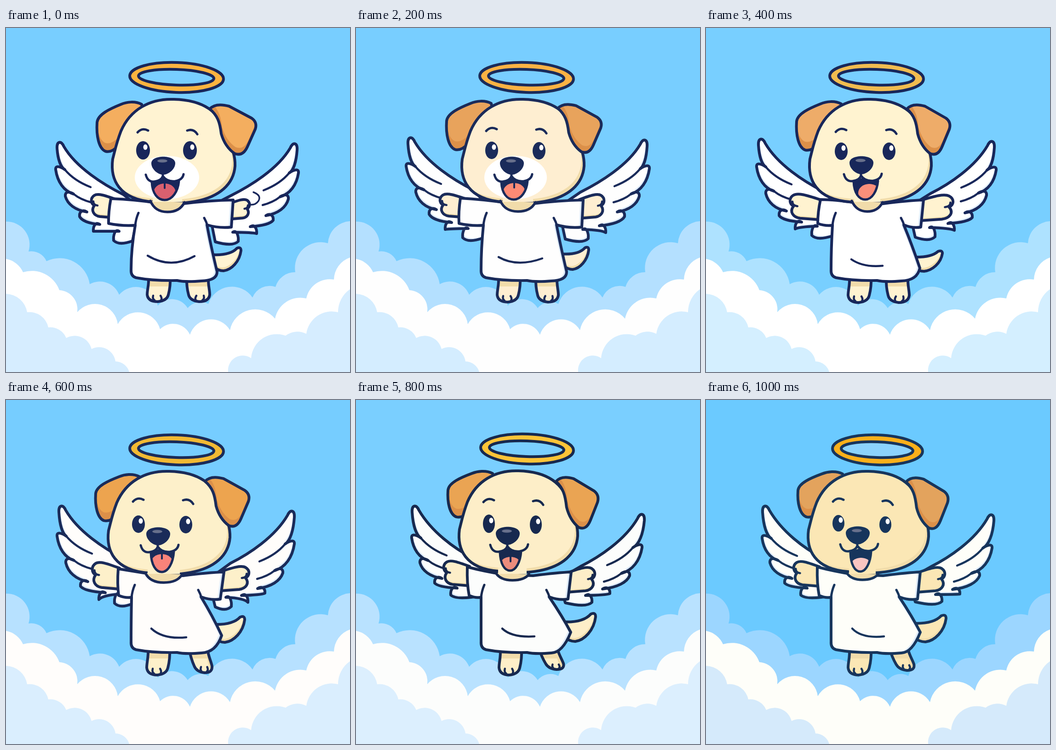
An HTML page with a canvas that plays this animation: 748 px wide and 748 px high, repeating every 1.2 s.

```html
<!DOCTYPE html>
<html lang="en">
<head>
<meta charset="utf-8">
<title>Angel puppy</title>
<style>
html, body { margin: 0; width: 100%; height: 100%; overflow: hidden; background: #78ceff; }
canvas { display: block; }
</style>
</head>
<body>
<canvas width="748" height="748"></canvas>
<script>
const ctx = document.querySelector('canvas').getContext('2d');
const STEP = 200;
const CREAM_SHADE = '#f1dcaa', EAR_SHADE = '#dc9049', WHITE_SHADE = '#dbe9f9';

const clouds = {
  back: 'M0 421A50 50 0 0 1 49 486A36 36 0 0 1 88 507A66 66 0 0 1 182 557A45 45 0 0 1 246 580A48 48 0 0 1 330 604A40 40 0 0 1 395 609A36 36 0 0 1 440 600A54 54 0 0 1 536 586A40 40 0 0 1 586 563A44 44 0 0 1 629 531A56 56 0 0 1 700 468A51 51 0 0 1 748 420V748H0Z',
  front: 'M0 502A50 50 0 0 1 37 531A64 64 0 0 1 116 570A42 42 0 0 1 155 618A50 50 0 0 1 243 644A50 50 0 0 1 335 655A40 40 0 0 1 400 667A48 48 0 0 1 487 657A56 56 0 0 1 585 632A56 56 0 0 1 653 588A52 52 0 0 1 713 547A52 52 0 0 1 748 499V748H0Z',
  near: 'M0 578A48 48 0 0 1 46 618A42 42 0 0 1 92 651A38 38 0 0 1 131 674A38 38 0 0 1 186 698A36 36 0 0 1 238 725A32 32 0 0 1 268 748H0ZM483 748A32 32 0 0 1 533 718A56 56 0 0 1 608 669A42 42 0 0 1 653 665A56 56 0 0 1 722 618A60 60 0 0 1 748 568V748Z'
};

// Parts drawn once; every pose fits them into its own box [x, y, w, h, skew].
const parts = {
  head: { box: [231, 155, 267, 226],
    d: 'M365 155C312 153 270 178 250 224C240 250 238 262 232 285C226 330 246 372 318 378Q370 385 412 377C464 367 495 340 498 300C499 272 487 252 479 232C470 195 444 157 365 155Z' },
  earL: { box: [198, 161, 102, 109],
    d: 'M295 166C280 158 262 161 250 166C225 176 200 188 198 205C196 235 202 262 216 268Q230 272 245 255L300 190Z' },
  earR: { box: [443, 167, 101, 107],
    d: 'M443 176C453 165 470 166 485 170L534 196Q547 205 542 220L525 258Q515 280 497 273Q476 258 468 230C465 205 460 190 443 176Z' },
  hand: { box: [185, 361, 55, 51],
    d: 'M240 373C215 364 200 359 192 364C183 370 184 381 192 386C184 397 191 408 204 410L240 413Z',
    line: 'M190 377Q190 385 199 386' },
  leg: { box: [307, 540, 50, 55],
    d: 'M310 540C311 560 307 568 307 580Q309 595 330 595Q350 593 353 580Q358 562 357 540Z',
    line: 'M320 582Q318 589 323 592M336 582Q340 588 337 592' },
  tail: { box: [450, 477, 61, 51],
    d: 'M450 493C475 494 492 490 502 479Q511 475 511 484C508 508 490 526 473 528Q462 528 450 519Z' },
  mouth: { box: [317, 333, 59, 41],
    d: 'M317 335C318 360 330 374 345 374C362 374 374 355 376 333L345 328Z' }
};

const poses = [
  { sky: '#78ceff', back: '#b9e2ff', front: '#ffffff', near: '#d6edff', ink: '#18265a', cream: '#fff3d2', earC: '#f4ae5f', gold: '#fcb340', pink: '#d9606f',
    halo: [371, 107, 102], head: [231, 155, 267, 226], earL: [198, 161, 102, 109], earR: [443, 167, 101, 107],
    handL: [185, 361, 55, 51], handR: [530, 372, -45, 43], legL: [307, 540, 50, 55], legR: [443, 540, -50, 55], tail: [450, 477, 61, 51],
    wingL: [111, 258, 108, 304, 129, 362, 160, 406, 190, 438, 234, 458], wingR: [633, 261, 636, 311, 614, 368, 581, 414, 545, 443, 505, 460],
    dress: [228, 371, 223, 494, 490, 281, 437, 459, 530], neck: [314, 388, 400], smile: 'M308 495Q358 525 410 496', curl: 'M538 357Q556 364 549 376Q542 386 530 384',
    eyes: [298, 266, 400, 266, 15, 20], brow: -39, nose: [342, 299], mouth: [317, 333, 59, 41], tongue: [345, 358], muzzle: 70 },
  { sky: '#78ceff', back: '#b4e0ff', front: '#fefefe', near: '#d4edff', ink: '#1a2b5a', cream: '#feeed1', earC: '#e8a35c', gold: '#fbb244', pink: '#fd8a75',
    halo: [371, 107, 102], head: [230, 155, 266, 226], earL: [197, 159, 102, 107], earR: [439, 166, 95, 104],
    handL: [182, 360, 58, 51], handR: [540, 361, -55, 52], legL: [307, 540, 50, 56], legR: [440, 540, -49, 56], tail: [450, 476, 56, 49],
    wingL: [113, 248, 109, 297, 130, 353, 159, 401, 194, 434, 232, 452], wingR: [633, 253, 638, 302, 616, 362, 584, 406, 543, 441, 505, 454],
    dress: [227, 370, 224, 494, 491, 277, 436, 458, 530], neck: [314, 390, 399], smile: 'M310 498Q350 521 405 501',
    eyes: [295, 266, 398, 267, 14, 19], brow: -42, nose: [339, 299], mouth: [316, 333, 57, 40], tongue: [344, 357], muzzle: 68 },
  { sky: '#78cfff', back: '#aee2ff', front: '#ffffff', near: '#d4efff', ink: '#18275a', cream: '#fff3d0', earC: '#eeac69', gold: '#f1bc50', pink: '#fb8f7a',
    halo: [371, 107, 102], head: [225, 155, 265, 226], earL: [197, 160, 102, 107], earR: [437, 167, 94, 107],
    handL: [182, 360, 66, 56], handR: [538, 362, -73, 56], legL: [309, 540, 50, 57], legR: [442, 540, -50, 57], tail: [450, 484, 64, 45],
    wingL: [114, 251, 110, 298, 130, 356, 159, 404, 194, 433, 230, 447], wingR: [627, 256, 631, 305, 610, 360, 579, 408, 540, 436, 498, 450],
    dress: [249, 373, 243, 473, 467, 275, 430, 465, 522], neck: [317, 384, 399], smile: 'M316 503Q342 521 384 517',
    eyes: [294, 268, 398, 268, 14, 19], brow: -42, nose: [338, 298], mouth: [321, 332, 53, 41], tongue: [355, 359] },
  { sky: '#76cdff', back: '#b7e1ff', front: '#fffdfb', near: '#daeefe', ink: '#1a2b59', cream: '#fdf0ca', earC: '#eda44f', gold: '#f2b933', pink: '#f9837a',
    halo: [371, 108, 102], head: [222, 155, 265, 224], earL: [195, 162, 100, 102], earR: [433, 168, 96, 106],
    handL: [187, 352, 60, 58], handR: [529, 361, -64, 53], legL: [306, 540, 50, 58], legR: [440, 540, -42, 53, .2], tail: [450, 470, 69, 57],
    wingL: [115, 240, 111, 292, 130, 350, 162, 401, 202, 430, 236, 438], wingR: [627, 251, 627, 309, 602, 372, 563, 416, 526, 436, 490, 445],
    dress: [244, 367, 245, 474, 466, 273, 424, 469, 512], neck: [303, 383, 397], smile: 'M316 497Q342 521 392 516',
    eyes: [288, 270, 391, 271, 14, 19], brow: -49, nose: [331, 296], mouth: [315, 330, 50, 44], tongue: [339, 355] },
  { sky: '#7acfff', back: '#b9e2ff', front: '#fcfdfc', near: '#dceffe', ink: '#17294f', cream: '#fdeec8', earC: '#eaa453', gold: '#fdc438', pink: '#ec8c7c',
    halo: [372, 106, 101], head: [224, 154, 258, 221], earL: [200, 155, 102, 101], earR: [435, 168, 92, 110],
    handL: [190, 349, 57, 54], handR: [520, 363, -61, 54], legL: [311, 540, 49, 58], legR: [440, 540, -42, 46, .28], tail: [450, 463, 71, 62],
    wingL: [122, 240, 121, 296, 139, 350, 171, 394, 206, 420], wingR: [627, 258, 622, 317, 595, 378, 552, 417, 513, 436],
    dress: [242, 363, 246, 468, 461, 272, 420, 467, 505], neck: [304, 376, 392], smile: 'M318 497Q339 517 388 514',
    eyes: [289, 269, 391, 271, 13, 20], brow: -47, nose: [330, 295], mouth: [313, 329, 46, 42], tongue: [336, 361] },
  { sky: '#6bcaff', back: '#9cd6ff', front: '#fefef9', near: '#d5eafb', ink: '#17355c', cream: '#fbe7b5', earC: '#e3a35d', gold: '#fbb01a', pink: '#f9c5c1', hole: '#8bd3fd',
    halo: [373, 108, 98], head: [222, 155, 262, 221], earL: [200, 156, 102, 100], earR: [435, 169, 92, 110],
    handL: [190, 350, 57, 54], handR: [520, 363, -61, 54], legL: [309, 540, 50, 58], legR: [441, 540, -42, 48, .28], tail: [450, 467, 72, 59],
    wingL: [123, 240, 122, 297, 139, 350, 171, 394, 206, 420], wingR: [626, 259, 622, 318, 595, 378, 552, 418, 513, 434],
    dress: [242, 363, 246, 466, 460, 272, 420, 466, 505], neck: [306, 374, 391], smile: 'M318 497Q339 519 387 514',
    eyes: [288, 268, 390, 271, 13, 18], brow: -47, nose: [330, 294], mouth: [314, 330, 45, 43], tongue: [337, 363] }
];

function fit(d, [bx, by, bw, bh], [x, y, w, h, k = 0]) {
  const a = w / bw, e = h / bh, path = new Path2D();
  path.addPath(new Path2D(d), new DOMMatrix([a, 0, k, e, x - a * bx - k * by, y - e * by]));
  return path;
}

function fill(path, color) {
  ctx.fillStyle = color;
  ctx.fill(path);
}

function line(path, width = 4.5) {
  ctx.lineWidth = width;
  ctx.stroke(typeof path === 'string' ? new Path2D(path) : path);
}

function oval(x, y, rx, ry, color, turn = 0) {
  const path = new Path2D();
  path.ellipse(x, y, rx, ry, turn, 0, 7);
  fill(path, color);
  return path;
}

// Outlined shape whose lit area is moved by (dx, dy) over its shade.
function paint(path, color, shade, dx, dy) {
  fill(path, shade);
  ctx.save();
  ctx.clip(path);
  ctx.translate(dx, dy);
  fill(path, color);
  ctx.restore();
  line(path, 6);
}

function part(name, box, color, shade, dx, dy) {
  const p = parts[name];
  paint(fit(p.d, p.box, box), color, shade, dx, dy);
  if (p.line) line(fit(p.line, p.box, box));
}

// Feather tips run from the top down; s is 1 for the left wing, -1 for the right.
function wing(tips, s, white) {
  const rootX = s > 0 ? 255 : 488, endX = s > 0 ? 275 : 455;
  const [x0, y0] = tips;
  let d = `M${rootX} ${y0 + 104}C${rootX - 42 * s} ${y0 + 83} ${x0 + 42 * s} ${y0 + 46} ${x0 + 15 * s} ${y0}` +
    `C${x0 + 9 * s} ${y0 - 14} ${x0 - s} ${y0 - 12} ${x0} ${y0 + 4}`;
  let veins = '';
  for (let i = 2; i < tips.length; i += 2) {
    const n = i / 2 - 1, x = tips[i], y = tips[i + 1];
    const px = tips[i - 2], py = tips[i - 1] + 4;
    const nx = x + (20 - 2 * n) * s, ny = y + 4 - 5 * n;
    const w = nx - px, h = ny - py;
    d += `C${px + w * .1} ${py + h * .5} ${nx - w * .55} ${ny - h * .12} ${nx} ${ny}` +
      `C${nx - 9 * s} ${ny - 6} ${x - s} ${y - 7} ${x} ${y + 4}`;
    if (n < 2) veins += `M${nx} ${ny}q${(20 - 5 * n) * s} ${24 - 12 * n} ${(56 - 18 * n) * s} ${38 - 20 * n}`;
  }
  const [x, y] = tips.slice(-2);
  d += `Q${x + 12 * s} ${y + 16} ${endX} ${y + 5}L${endX + 15 * s} 390Z`;
  paint(new Path2D(d), white, WHITE_SHADE, 3 * s, -5);
  line(veins);
}

function halo({ halo: [x, y, r], gold, hole, sky }) {
  const outer = oval(x, y + .5, r, 32.5, gold, .035);
  const inner = oval(x - 1, y, r - 20, 17, hole || sky, .035);
  line(outer, 6);
  line(inner, 6);
}

function dress([lt, top, lb, rt, rb, lx, ax, hx, hy], smile, white) {
  paint(new Path2D(`M${lt} ${top}Q280 373 325 380L385 382Q440 375 ${rt} 374L${rb} 433Q${(rb + ax) / 2} 436 ${ax} 428` +
    `Q${(hx + 430) / 2} 470 ${hx} ${hy}Q${hx + (hy - 530) * .7} 549 425 550Q390 553 372 549Q320 550 283 543Q271 540 272 525` +
    `Q272 480 ${lx} 429Q${(lx + lb) / 2} 431 ${lb} 425Q${(lt + lb) / 2 - 3} 400 ${lt} ${top}Z`), white, WHITE_SHADE, -6, -2);
  line(`M${lx + 7} 402Q${lx + 1} 416 ${lx} 430M${ax - 6} 413Q${ax - 1} 422 ${ax + 1} 430`, 5);
  line(smile);
}

// The neck opens into the chin, so it hides the lower edge of the head.
function neck([l, r, b], cream) {
  const path = new Path2D(`M${l} 376Q${l + 10} ${b} ${(l + r) / 2} ${b}Q${r - 10} ${b} ${r} 379`);
  fill(path, CREAM_SHADE);
  ctx.fillStyle = cream;
  ctx.fillRect(l + 5, 366, r - l - 10, 12);
  line(path, 5.5);
}

function face(p) {
  const [lx, ly, rx, ry, w, h] = p.eyes, [nx, ny] = p.nose, [tx, ty] = p.tongue;
  if (p.muzzle) oval(nx + 8, ny + 26, p.muzzle, 47, '#ffffff');
  for (const [x, y] of [[lx, ly], [rx, ry]]) {
    oval(x, y, w, h, p.ink);
    oval(x + 5, y - 7, 4.5, 6, '#ffffff');
  }
  line(`M${lx - 12} ${ly + p.brow}q10 -11 23 -4M${rx - 6} ${ry + p.brow - 4}q14 -5 22 8`, 5);

  const mouth = fit(parts.mouth.d, parts.mouth.box, p.mouth);
  fill(mouth, p.ink);
  ctx.save();
  ctx.clip(mouth);
  oval(tx, ty, 24, 20, p.pink);
  if (tx - nx < 10 && !p.hole) line(`M${tx} ${ty - 20}v10`, 4);
  ctx.restore();
  line(mouth, 5);

  ctx.save();
  ctx.translate(nx - 342, ny - 299);
  // Cover the upper lip with fur before drawing its line.
  fill(new Path2D('M306 320Q309 334 322 334Q338 332 341 322Q350 335 368 333Q384 330 386 318Z'), p.muzzle ? '#ffffff' : p.cream);
  line('M304 319Q308 335 322 334Q338 332 341 322Q350 335 368 333Q384 330 386 318M341 316V324', 5);
  fill(new Path2D('M316 294C316 275 368 275 368 294C368 308 352 319 342 319C330 319 316 307 316 294Z'), p.ink);
  oval(340, 289, 11, 3.5, '#68708c');
  ctx.restore();
}

function draw(p) {
  ctx.lineJoin = ctx.lineCap = 'round';
  ctx.strokeStyle = p.ink;
  ctx.fillStyle = p.sky;
  ctx.fillRect(0, 0, 748, 748);
  for (const name in clouds) fill(new Path2D(clouds[name]), p[name]);

  halo(p);
  wing(p.wingL, 1, p.front);
  wing(p.wingR, -1, p.front);
  part('tail', p.tail, p.cream, CREAM_SHADE, -2, -7);
  part('hand', p.handL, p.cream, CREAM_SHADE, 0, -5);
  part('hand', p.handR, p.cream, CREAM_SHADE, 0, -5);
  if (p.curl) line(p.curl, 3.5);
  part('leg', p.legL, p.cream, CREAM_SHADE, 0, 22);
  part('leg', p.legR, p.cream, CREAM_SHADE, 0, 22);
  part('earL', p.earL, p.earC, EAR_SHADE, 0, -18);
  dress(p.dress, p.smile, p.front);
  part('head', p.head, p.cream, CREAM_SHADE, -6, -8);
  neck(p.neck, p.cream);
  part('earR', p.earR, p.earC, EAR_SHADE, 2, -14);
  face(p);
}

const start = performance.now();
function loop() {
  draw(poses[Math.floor((performance.now() - start) / STEP) % poses.length]);
  requestAnimationFrame(loop);
}
loop();
</script>
</body>
</html>
```
